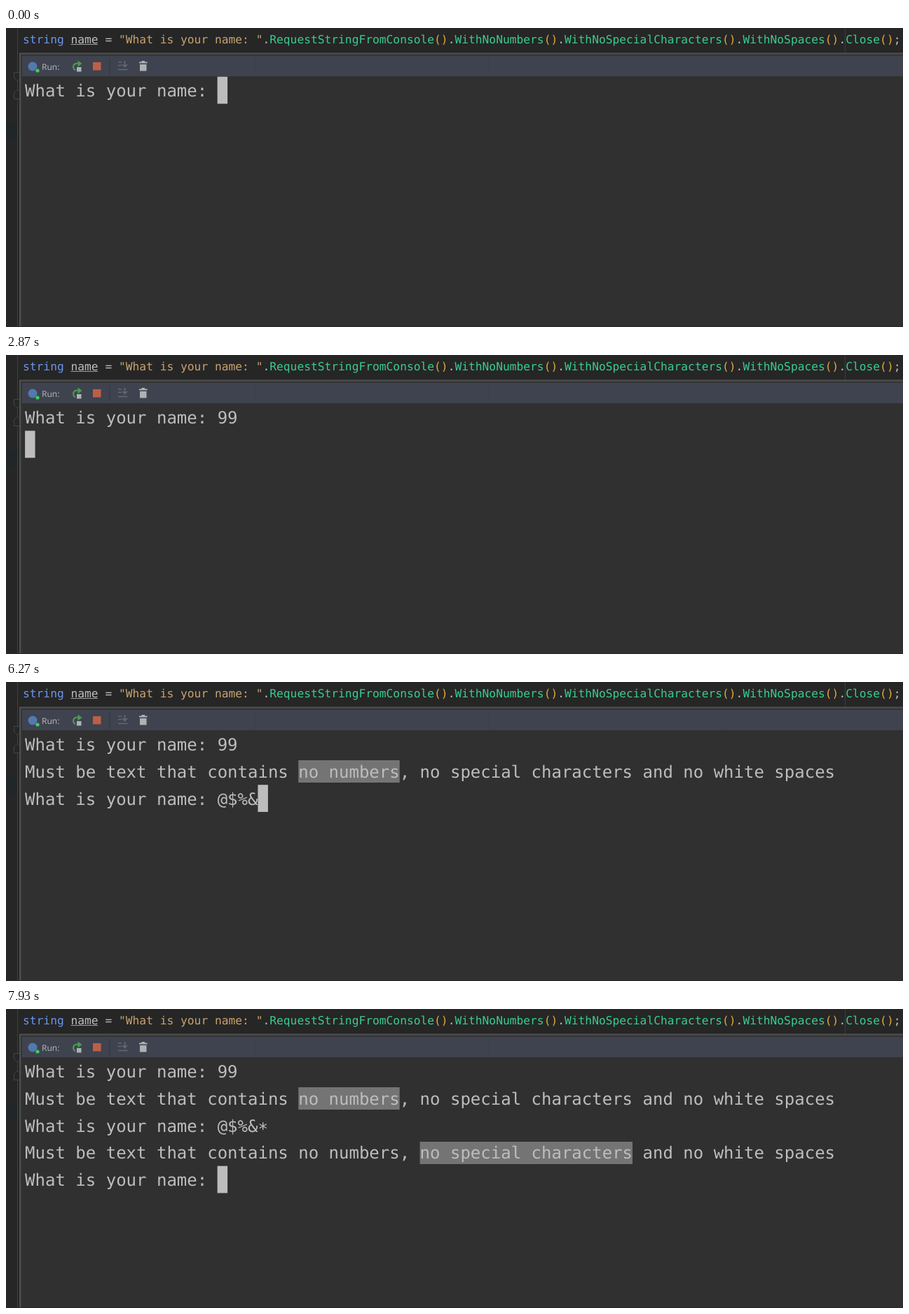
Write an HTML page that moves like this. It is 1280x428 px and loops after 8 s.

```html
<!DOCTYPE html>
<html lang="en">
<head>
<meta charset="utf-8">
<title>Console prompt</title>
<style>
  html, body { margin: 0; width: 100%; height: 100%; overflow: hidden; background: #262626; }
  svg { display: block; width: 1280px; height: 428px; }
  text { white-space: pre; text-rendering: geometricPrecision; font-variant-ligatures: none; }
  .mono { font-family: "DejaVu Sans Mono", "Noto Sans Mono", monospace; }
  .code { font-size: 16.25px; fill: #bdbdbd; }
  .out { font-size: 24px; fill: #bdbdbd; }
  .label { font: 12px "Open Sans", "Noto Sans", sans-serif; fill: #bbbbbb; }
</style>
</head>
<body>
<svg viewBox="0 0 1280 428">
  <rect width="1280" height="428" fill="#262626"/>

  <!-- editor behind the tool window -->
  <rect y="135" width="17" height="26" fill="#212729"/>
  <path d="M16.5 0V428" stroke="#404040"/>
  <path d="M1197.5 0V37" stroke="#3c3c3c"/>
  <g fill="#262626" stroke="#464646">
    <path d="M11.5 63.5H21V71L16.5 76L11.5 71Z"/>
    <path d="M11.5 101.5H21V93L16.5 88L11.5 93Z"/>
  </g>
  <text id="code" class="mono code" x="24" y="21.5"></text>
  <path d="M92.5 23.5H131" stroke="#a0a0a0"/>

  <!-- tool window -->
  <rect x="19" y="35.5" width="1261" height="393" fill="#505050"/>
  <rect x="21" y="37.5" width="1259" height="391" fill="#343536"/>
  <rect x="23" y="40" width="1257" height="29" fill="#3f434f"/>
  <path d="M356 40V69M689 40V69M1022.5 40V69" stroke="#3c404a"/>
  <rect x="23" y="69" width="1257" height="358" fill="#303030"/>
  <rect x="0" y="427" width="1280" height="1" fill="#292929"/>

  <!-- toolbar -->
  <circle cx="38" cy="55" r="6.5" fill="#5279b0"/>
  <circle cx="45" cy="61" r="2.6" fill="#3fd05c"/>
  <text class="label" x="51" y="60">Run:</text>
  <path d="M99 60.4A5.3 5.3 0 0 1 99.5 50.7H103" fill="none" stroke="#499c54" stroke-width="2"/>
  <path d="M102.5 46.5L108.5 51L102.5 55.5Z" fill="#499c54"/>
  <rect x="101" y="56" width="6.5" height="6.5" fill="#afb1b3"/>
  <rect x="124" y="49" width="11.5" height="11.5" fill="#bd5f45"/>
  <path d="M148 43V67" stroke="#34373f"/>
  <path d="M160 49H165M160 53.5H165M160 59.5H173.5M169.5 47V55M166 52L169.5 55.5L173 52"
        fill="none" stroke="#65686f" stroke-width="1.7"/>
  <path d="M190 48.5H193.5V47H198V48.5H201.5V50.5H190ZM191 52H200.5V61.5H191Z" fill="#afb1b3"/>

  <g id="screen"></g>
</svg>
<script>
const LOOP = 8000;
const LEFT = 27.1, TOP = 69.7, COL = 14.449, ROW = 38.75;
const PROMPT = "What is your name: ";
const ERROR = "Must be text that contains no numbers, no special characters and no white spaces";
const NS = "http://www.w3.org/2000/svg";
const screen = document.getElementById("screen");

function add(parent, tag, attrs, content) {
  const el = document.createElementNS(NS, tag);
  for (const key in attrs) el.setAttribute(key, attrs[key]);
  if (content) el.textContent = content;
  return parent.appendChild(el);
}

function drawCode() {
  const source = `string name = "${PROMPT}"` +
    ["RequestStringFromConsole", "WithNoNumbers", "WithNoSpecialCharacters", "WithNoSpaces", "Close"]
      .map(name => `.${name}()`).join("") + ";";
  const color = token =>
    token === "string" ? "#6c95eb" :
    token[0] === '"' ? "#c9a26d" :
    token === "()" ? "#e0a83a" :
    /^[A-Z]/.test(token) ? "#39cc8f" : "#bdbdbd";
  const code = document.getElementById("code");
  for (const token of source.match(/"[^"]*"|\w+|\(\)|[^\w"()]+/g))
    add(code, "tspan", { fill: color(token) }, token);
}

// Each step: start time, typed answer, cursor shown.
const FIRST = [
  [0, "", true], [200, "", false], [750, "", true], [1280, "", false], [1810, "", true],
  [2010, "9", true], [2340, "99", true], [2800, "99", false]
];
const SECOND = [
  [2940, "", true], [4000, "", false], [4400, "@", true], [5080, "@$", true],
  [5540, "@$", false], [5670, "@$%", true], [6270, "@$%&", true],
  [6800, "@$%&", false], [6930, "@$%&*", true]
];

function typing(steps, t, before) {
  const [, answer, shown] = steps.filter(step => step[0] <= t).pop();
  const lines = [...before, PROMPT + answer];
  const cursor = shown && [lines.length - 1, PROMPT.length + answer.length];
  return { lines, cursor };
}

function stateAt(t) {
  const first = [PROMPT + "99"];
  const second = [...first, ERROR, PROMPT + "@$%&*"];
  if (t < 2870) return typing(FIRST, t, []);
  if (t < 2940) return { lines: [...first, ""], cursor: [1, 0] };
  if (t < 7860) return typing(SECOND, t, [...first, ERROR]);
  if (t < 7930) {
    const part = ERROR.slice(0, ERROR.indexOf(",") + 1);
    return { lines: [...second, part], cursor: [3, part.length - 1] };
  }
  return { lines: [...second, ERROR, PROMPT], cursor: [4, PROMPT.length] };
}

const colX = col => LEFT + col * COL;
const rowY = row => TOP + row * ROW;

function drawMark(row, phrase) {
  add(screen, "rect", {
    x: colX(ERROR.indexOf(phrase)), y: Math.round(rowY(row) + 3.8),
    width: phrase.length * COL, height: 32, fill: "#747474"
  });
}

function drawText(row, col, string, fill) {
  const text = add(screen, "text", { class: "mono out", x: colX(col), y: rowY(row) + 28.3 });
  if (fill) text.style.fill = fill;
  // The asterisk sits at mid height.
  for (const part of string.split(/(\*)/).filter(Boolean))
    add(text, "tspan", part === "*" ? { dy: 4.5 } : {}, part);
}

function draw({ lines, cursor }) {
  screen.replaceChildren();
  if (lines.length > 2) drawMark(1, "no numbers");
  if (lines.length > 4) drawMark(3, "no special characters");
  lines.forEach((line, row) => drawText(row, 0, line));
  if (!cursor) return;
  const [row, col] = cursor;
  add(screen, "rect", { x: colX(col), y: rowY(row), width: COL, height: ROW, fill: "#bdbdbd" });
  const under = lines[row][col];
  if (under) drawText(row, col, under, "#303030");
}

let shown = "";
function frame(now) {
  const state = stateAt((now - start) % LOOP);
  const key = JSON.stringify(state);
  if (key !== shown) draw(state);
  shown = key;
  requestAnimationFrame(() => frame(performance.now()));
}

drawCode();
const start = performance.now();
frame(start);
</script>
</body>
</html>
```
